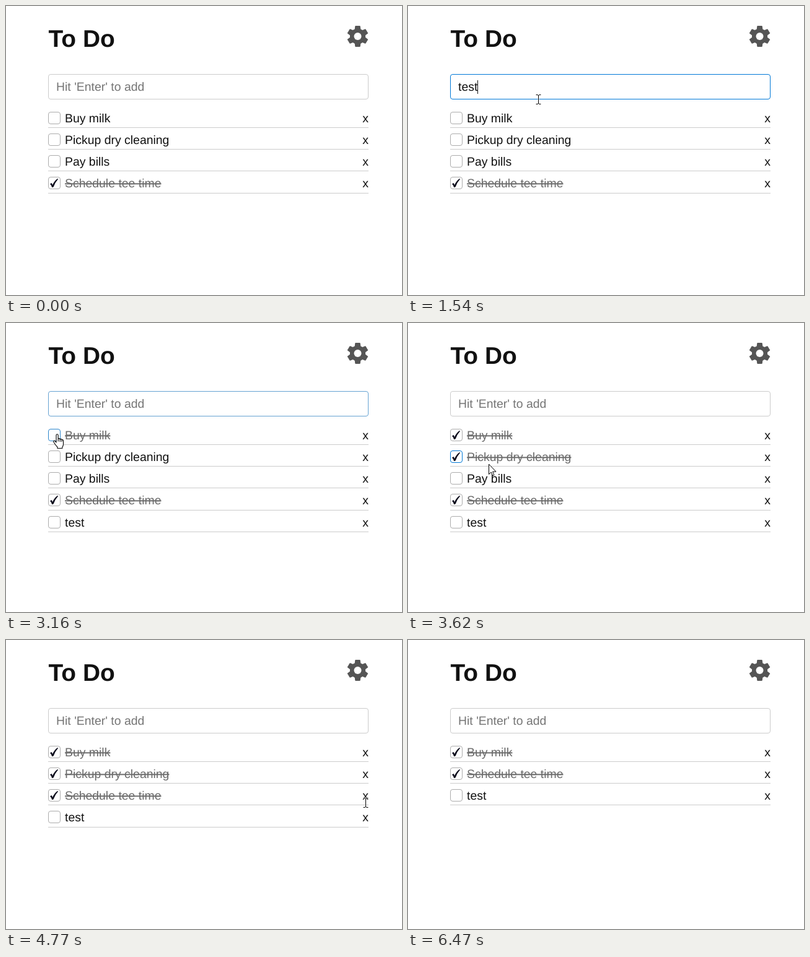
These frames come from a looping animation (639x467 px, 6930 ms). An HTML page:

```html
<!DOCTYPE html>
<html lang="en">
<head>
<meta charset="utf-8">
<title>To Do</title>
<style>
  html, body { margin: 0; width: 100%; height: 100%; overflow: hidden; background: #fff; }
  svg { display: block; }
  text {
    font: 19.43px "Liberation Sans", Arial, sans-serif;
    fill: #111;
    text-rendering: geometricPrecision;
    white-space: pre;
  }
  .title { font-size: 38.86px; font-weight: bold; }
  .hint { fill: #757575; }
  .done { fill: #6b6b6b; text-decoration: line-through; }
  .frame { fill: #fff; stroke: #ccc; }
  .rule { fill: #ccc; }
  .pointer path { stroke-linejoin: round; stroke-linecap: round; }
</style>
</head>
<body>
<svg width="639" height="467" viewBox="0 0 639 467">
  <defs>
    <path id="tooth" d="M-3.6-17H3.6L4.2-16.3 4.9-11H-4.9L-4.2-16.3Z"/>
  </defs>
  <text class="title" x="68.5" y="66">To Do</text>
  <g id="gear" transform="translate(567.5 49)" fill="#555">
    <circle r="12.6"/>
  </g>

  <rect id="input" class="frame" x="68.5" y="110.5" width="516" height="40" rx="3.5"/>
  <text id="hint" class="hint" x="81" y="137">Hit 'Enter' to add</text>
  <text id="typed" x="81" y="137"></text>
  <rect id="caret" y="120" width="1" height="22" fill="#111"/>

  <g id="list"></g>

  <g class="pointer" id="arrow">
    <path d="M.5.5V16.5L4.2 13 6.6 18.8 9 17.8 6.6 12.2H11.6Z" fill="#fff" stroke="#000"/>
  </g>
  <g class="pointer" id="hand">
    <path transform="translate(-6 -1)" fill="#fff" stroke="#000" stroke-width="1.1"
      d="M5 14V2.5Q5 .8 6.6 .8T8.2 2.5V8.5Q8.4 7.6 9.7 7.6T11.2 9.2Q11.5 8.4 12.6 8.4T14 10Q14.3 9.4 15.2 9.6T16.5 11V17Q16.5 19.5 14.8 21.5V23.5H7V21.5Q4 18.5 1 13.5Q.2 11.8 1.4 11.2T3.6 12.4ZM8.2 8.5V12M11.2 9.2V12.5M14 10V12.5"/>
  </g>
  <g class="pointer" id="beam">
    <path d="M-3-7.5H-1L.5-6.5 2-7.5H4M.5-6.5V6.5M-3 7.5H-1L.5 6.5 2 7.5H4" fill="none" stroke="#fff" stroke-width="2.4" opacity=".7"/>
    <path d="M-3-7.5H-1L.5-6.5 2-7.5H4M.5-6.5V6.5M-3 7.5H-1L.5 6.5 2 7.5H4" fill="none" stroke="#000"/>
  </g>
  <g class="pointer" id="bar">
    <rect x="0" y="-7" width="1" height="15"/>
  </g>
</svg>

<script>
const LOOP = 6930, TICK = 77, PITCH = 35.3;
const GREY = [204, 204, 204], BOX = [172, 172, 172], BLUE = [0, 120, 215];
const TICK_PATH = 'M3 11.5L5.6 10Q6.6 11.5 7 13.2 10 6.5 15 3L16.2 3.6Q11 9.5 8.6 16.6L6.2 17.2Q5 13.2 3 11.5Z';

const $ = id => document.getElementById(id);
const clamp = v => Math.max(0, Math.min(1, v));
const show = (el, on) => el.setAttribute('visibility', on ? 'visible' : 'hidden');
const mix = (a, b, t) => `rgb(${a.map((v, i) => Math.round(v + (b[i] - v) * t))})`;

function add(parent, tag, attrs, text) {
  const el = document.createElementNS('http://www.w3.org/2000/svg', tag);
  for (const key in attrs) el.setAttribute(key, attrs[key]);
  if (text) el.textContent = text;
  return parent.appendChild(el);
}

// Ticks at which each item appears, is checked, loses focus and is removed.
const items = [
  { text: 'Buy milk', check: 41, blur: 45 },
  { text: 'Pickup dry cleaning', check: 45, blur: 58, end: 74 },
  { text: 'Pay bills', end: 59 },
  { text: 'Schedule tee time', check: -9, blur: -5 },
  { text: 'test', start: 26 }
];

// Pointer path: tick, shape, x, y.
const route = [
  [2, 'arrow', 322, 447], [9, 'arrow', 221, 172], [10, 'bar', 212, 149], [11, 'bar', 210, 143],
  [14, 'bar', 210, 143], [20, 'beam', 210, 151], [31, 'beam', 210, 151], [32, 'arrow', 199, 155],
  [34, 'beam', 152, 177], [35, 'beam', 132, 192], [37, 'beam', 106, 217], [39, 'hand', 86, 193],
  [40, 'hand', 82, 180], [42, 'hand', 82, 180], [44, 'hand', 81, 213], [46, 'hand', 82, 215],
  [47, 'arrow', 130, 228], [50, 'arrow', 470, 313], [51, 'arrow', 525, 326], [54, 'arrow', 557, 268],
  [57, 'beam', 578, 258], [59, 'beam', 580, 252], [62, 'beam', 580, 263], [63, 'beam', 580, 263],
  [67, 'beam', 580, 238], [68, 'beam', 580, 238], [72, 'beam', 581, 217], [75, 'beam', 581, 217],
  [76, 'arrow', 569, 241], [83, 'arrow', 474, 391], [84, '', 0, 0]
];
const shapes = ['arrow', 'hand', 'beam', 'bar'];

for (let i = 0; i < 6; i++) add($('gear'), 'use', { href: '#tooth', transform: `rotate(${i * 60})` });
add($('gear'), 'circle', { r: 6, fill: '#fff' });

for (const item of items) {
  item.row = add($('list'), 'g', {});
  item.rule = add(item.row, 'rect', { class: 'rule', x: 68, width: 517, height: 1 });
  item.label = add(item.row, 'text', { x: 95 }, item.text);
  item.cross = add(item.row, 'text', { x: 575.2 }, 'x');
  item.boxed = add(item.row, 'g', {});
  item.box = add(item.boxed, 'rect', { class: 'frame', x: .5, y: .5, width: 19, height: 19, rx: 3.5 });
  item.mark = add(item.boxed, 'path', { d: TICK_PATH, fill: '#0c0c1c' });
}

function drawInput(k) {
  const word = 'test'.slice(0, k < 15 || k > 25 ? 0 : k < 16 ? 1 : k < 18 ? 2 : k < 20 ? 3 : 4);
  const focus = k < 11 ? 0 : k < 12 ? .5 : k < 40 ? 1 : clamp(.85 - (k - 40) * .35);
  $('input').style.stroke = mix(GREY, BLUE, focus);
  $('typed').textContent = word;
  show($('hint'), !word);
  show($('caret'), k >= 12 && k < 32);
  $('caret').setAttribute('x', 81 + (word ? Math.round($('typed').getComputedTextLength()) : 0));
}

function drawList(k) {
  let n = 0;
  for (const item of items) {
    const { start = 0, end = 999, check = 999, blur = 999 } = item;
    const present = k >= start && k < end;
    item.row.style.display = present ? '' : 'none';
    if (!present) continue;
    const shift = PITCH * n++;
    const base = Math.floor(188 + shift);
    item.rule.setAttribute('y', Math.floor(196.2 + shift));
    item.label.setAttribute('y', base);
    item.cross.setAttribute('y', base);
    item.boxed.setAttribute('transform', `translate(68 ${base - 17})`);
    item.label.setAttribute('class', k >= check ? 'done' : '');
    item.mark.setAttribute('opacity', clamp((k - check) / 2));
    const focus = k < check ? 0 : k < blur ? clamp(.75 + (k - check) * .25) : clamp(.5 - (k - blur) * .5);
    item.box.style.stroke = mix(BOX, BLUE, focus);
  }
}

function drawPointer(k) {
  const i = route.findLastIndex(p => p[0] <= k);
  const [t0, shape, x0, y0] = route[i] || [0, '', 0, 0];
  for (const id of shapes) show($(id), id === shape);
  if (!shape) return;
  const [t1, , x1, y1] = route[i + 1];
  const t = (k - t0) / (t1 - t0);
  const x = Math.round(x0 + (x1 - x0) * t), y = Math.round(y0 + (y1 - y0) * t);
  $(shape).setAttribute('transform', `translate(${x} ${y})`);
}

function draw(now) {
  const k = Math.floor((now % LOOP + 7) / TICK) % 90;
  drawInput(k);
  drawList(k);
  drawPointer(k);
}

const began = performance.now();
function loop() {
  draw(performance.now() - began);
  requestAnimationFrame(loop);
}
loop();
</script>
</body>
</html>
```
